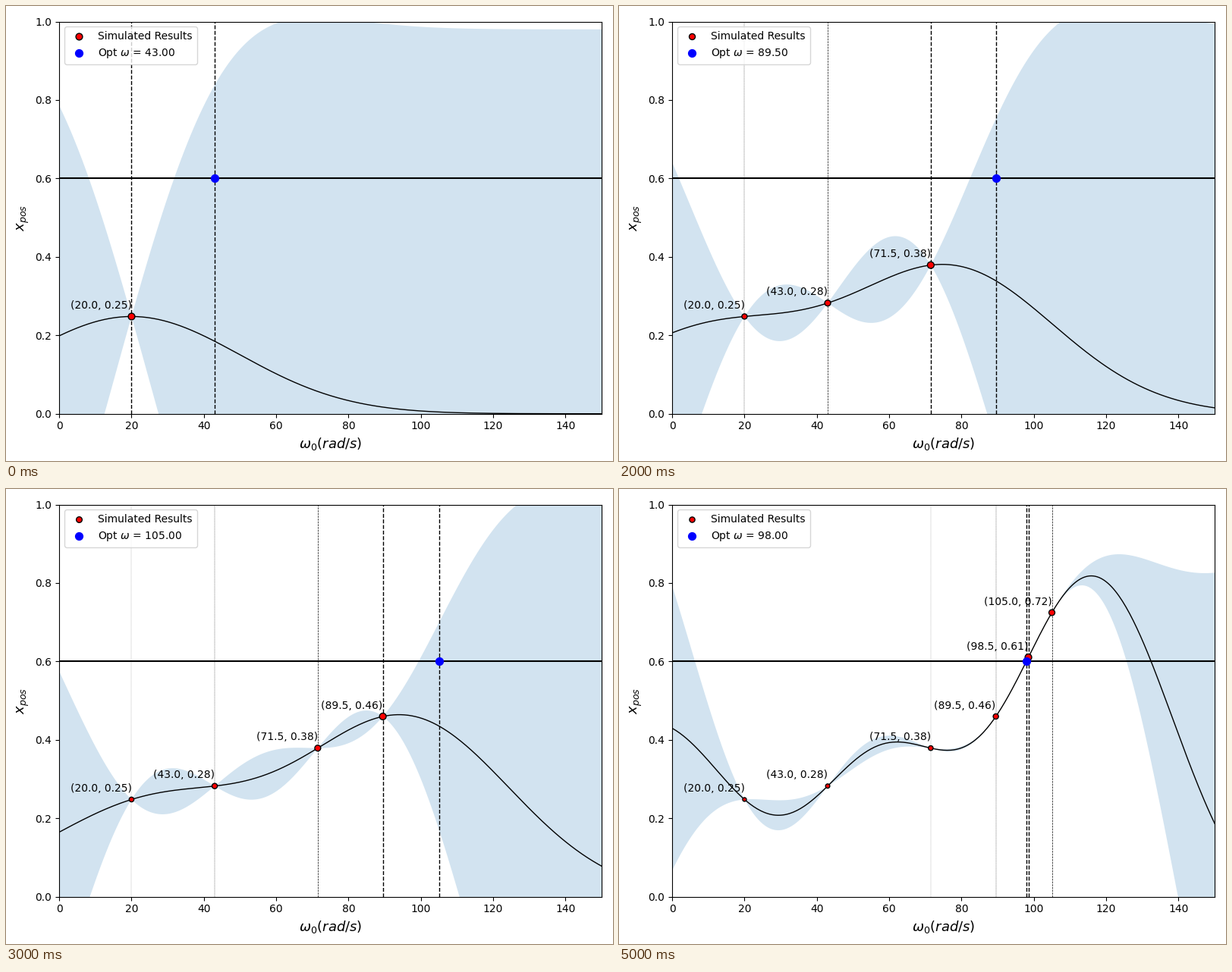
These frames come from a looping animation (800x600 px, 6 s). A matplotlib script:

```python
import numpy as np
import matplotlib.pyplot as plt
from matplotlib.animation import FuncAnimation

plt.rcParams["font.family"] = "DejaVu Sans"

# Sampled speeds and positions, in the order they were tried
W = np.array([20.0, 43.0, 71.5, 89.5, 105.0, 98.5])
POS = np.array([0.248, 0.2823, 0.379, 0.4597, 0.7245, 0.6105])
OPT = np.append(W[1:], 98.0)

GOAL = 0.6
LENGTH = 30.0
SIGMA = 0.5
GRID = np.linspace(0, 150, 301)

# Plot area in pixels, measured from the top left corner
LEFT, TOP, RIGHT, BOTTOM = 70.1, 20.5, 785, 537.7

fig, ax = plt.subplots(figsize=(8, 6), dpi=100)
fig.subplots_adjust(left=LEFT / 800, right=RIGHT / 800,
                    bottom=1 - BOTTOM / 600, top=1 - TOP / 600)


def kernel(a, b):
    d = a[:, None] - b[None, :]
    return SIGMA**2 * np.exp(-d**2 / (2 * LENGTH**2))


def posterior(x, y):
    """Gaussian process mean and standard deviation on the grid."""
    cross = kernel(GRID, x)
    gain = np.linalg.solve(kernel(x, x), cross.T).T
    var = SIGMA**2 - np.sum(gain * cross, axis=1)
    return gain @ y, np.sqrt(np.clip(var, 0, None))


def dashed(x, width=1.0):
    ax.axvline(x, color="black", ls="--", lw=width)


def draw(i):
    ax.cla()
    x, y = W[:i + 1], POS[:i + 1]
    age = np.arange(i, -1, -1)
    mean, std = posterior(x, y)

    ax.fill_between(GRID, mean - 1.96 * std, mean + 1.96 * std,
                    color="tab:blue", alpha=0.2, lw=0)
    ax.plot(GRID, mean, color="black", lw=1)
    ax.axhline(GOAL, color="black", lw=1.5)

    # Older samples fade: thinner lines, smaller dots
    for xi, a in zip(x, age):
        if a < 4:
            dashed(xi, 0.5**a)
    dashed(OPT[i])

    ax.scatter(x, y, s=40 * 0.8**age, c="red", edgecolors="black",
               linewidths=1, zorder=3, label="Simulated Results")
    ax.scatter([OPT[i]], [GOAL], s=50, c="blue", linewidths=1, zorder=4,
               label=rf"Opt $\omega$ = {OPT[i]:.2f}")
    for xi, yi in zip(x, y):
        ax.text(xi, yi + 0.02, f"({xi:.1f}, {yi:.2f})", ha="right")

    ax.set_xlim(0, 150)
    ax.set_ylim(0, 1)
    ax.set_xlabel(r"$\omega_0 (rad/s)$", fontsize=13)
    ax.set_ylabel(r"$x_{pos}$", fontsize=13)
    ax.legend(loc="upper left")
    return []


anim = FuncAnimation(fig, draw, frames=len(W), init_func=lambda: draw(0),
                     interval=1000, repeat=True, repeat_delay=0, blit=False)
plt.show()
```
